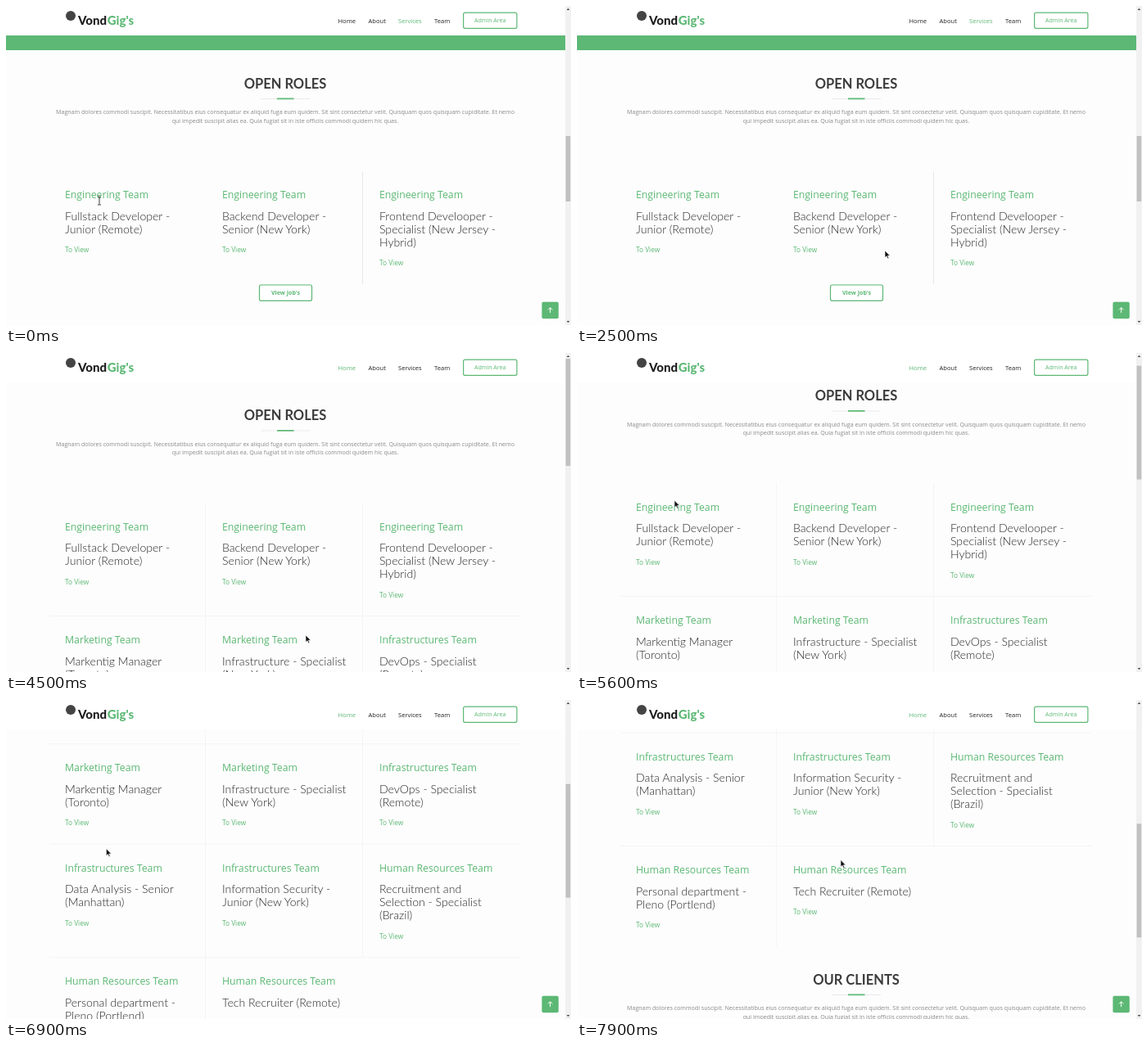
An HTML page for the animation above (8 s loop, 690 by 390 pixels).

```html
<!DOCTYPE html>
<html lang="en">
<head>
<meta charset="utf-8">
<title>Open roles</title>
<style>
  html, body { margin: 0; width: 100%; height: 100%; overflow: hidden; background: #fdfdfd; }
  svg { display: block; width: 100vw; height: 100vh; }
  text { font-family: "Open Sans", sans-serif; fill: #222; }
  .head { font: 700 16.5px Lato, sans-serif; fill: #3c3c3c; text-anchor: middle; }
  .para { font-size: 7.1px; fill: #8a8a8a; text-anchor: middle; }
  .team { font-size: 12.27px; fill: #5cb874; }
  .job { font: 300 14.1px Lato, sans-serif; fill: #262626; }
  .view { font-size: 8.3px; fill: #5cb874; }
  .nav { font-size: 7.58px; }
  .btn { font-size: 7.07px; fill: #5cb874; text-anchor: middle; }
  .logo { font: 800 15px Lato, sans-serif; fill: #1d1d1d; }
  .tip { font-size: 6px; fill: #5f6368; }
</style>
</head>
<body>
<svg id="stage" viewBox="0 0 690 390"></svg>
<script>
const GREEN = '#5cb874', RULE = '#f2f2f2', LOOP = 8000, STEP = 100;
const stage = document.getElementById('stage');

function add(parent, tag, attrs, text) {
  const node = document.createElementNS('http://www.w3.org/2000/svg', tag);
  set(node, attrs);
  if (text) node.textContent = text;
  parent.appendChild(node);
  return node;
}
function set(node, attrs) {
  for (const key in attrs) node.setAttribute(key, attrs[key]);
}
const group = parent => add(parent, 'g', {});
const rect = (parent, x, y, width, height, fill, more) =>
  add(parent, 'rect', { x, y, width, height, fill, ...more });
const label = (parent, cls, x, y, text) => add(parent, 'text', { class: cls, x, y }, text);
const show = (node, on) => node.setAttribute('display', on ? 'inline' : 'none');

const LOREM = [
  'Magnam dolores commodi suscipit. Necessitatibus eius consequatur ex aliquid fuga eum quidem. Sit sint consectetur velit. Quisquam quos quisquam cupiditate. Et nemo',
  'qui impedit suscipit alias ea. Quia fugiat sit in iste officiis commodi quidem hic quas.'
];
const ENG = 'Engineering Team', MKT = 'Marketing Team',
      INF = 'Infrastructures Team', HR = 'Human Resources Team';
const ROWS = [
  [[ENG, 'Fullstack Developer -', 'Junior (Remote)'],
   [ENG, 'Backend Developer -', 'Senior (New York)'],
   [ENG, 'Frontend Develooper -', 'Specialist (New Jersey -', 'Hybrid)']],
  [[MKT, 'Markentig Manager', '(Toronto)'],
   [MKT, 'Infrastructure - Specialist', '(New York)'],
   [INF, 'DevOps - Specialist', '(Remote)']],
  [[INF, 'Data Analysis - Senior', '(Manhattan)'],
   [INF, 'Information Security -', 'Junior (New York)'],
   [HR, 'Recruitment and', 'Selection - Specialist', '(Brazil)']],
  [[HR, 'Personal department -', 'Pleno (Portlend)'],
   [HR, 'Tech Recruiter (Remote)']]
];
const ROW_Y = [212, 350.5, 473, 611.5, 734];
const COL_X = [72, 264, 456];

function heading(parent, y, text) {
  label(parent, 'head', 341, y + 6.7, text);
  rect(parent, 311, y + 19.2, 60, 0.6, '#ddd');
  rect(parent, 331, y + 18.5, 20.5, 1.7, GREEN);
  LOREM.forEach((line, i) => label(parent, 'para', 341, y + 38.2 + i * 10.7, line));
}

function card(parent, x, y, [team, ...lines]) {
  label(parent, 'team', x, y + 4.6, team);
  lines.forEach((line, i) => label(parent, 'job', x, y + 31.3 + i * 16, line));
  label(parent, 'view', x, y + 38.8 + lines.length * 15.9, 'To View');
}

function button(parent, x, y, w, h, text, weight) {
  const box = rect(parent, x, y, w, h, '#fff', { rx: 2, stroke: GREEN, 'stroke-width': 1.2 });
  const name = label(parent, 'btn', x + w / 2, y + h / 2 + 2.5, text);
  name.style.fontWeight = weight;
  return { box, name };
}

rect(stage, 0, 0, 690, 390, '#fdfdfd');

// Landing page
const landing = group(stage);
rect(landing, 0, 35, 683, 19, GREEN);
heading(landing, 94, 'OPEN ROLES');
ROWS[0].forEach((item, i) => card(landing, COL_X[i], 230.5, item));
rect(landing, 435, 202.5, 0.8, 137, '#e2e2e2');
const viewJobs = button(landing, 309.5, 341, 64, 19.3, "View Job's", 700);

// Listing page
const listing = group(stage);
heading(listing, 75.5, 'OPEN ROLES');
ROWS.forEach((row, r) => {
  const top = ROW_Y[r] - 29.2, height = ROW_Y[r + 1] - ROW_Y[r];
  if (r) rect(listing, 53, top, 576, 0.8, RULE);
  row.forEach((item, c) => {
    card(listing, COL_X[c], ROW_Y[r], item);
    if (c < row.length - 1) rect(listing, 243.2 + c * 191.8, top, 0.8, height, RULE);
  });
});
heading(listing, 745, 'OUR CLIENTS');

// Header
rect(stage, 0, 0, 683, 36, '#fff');
add(stage, 'circle', { cx: 79, cy: 12, r: 6, fill: '#444' });
const logo = label(stage, 'logo', 88, 22.6, 'Vond');
add(logo, 'tspan', { fill: GREEN, dx: 0.8 }, "Gig's");
const nav = {};
[['Home', 405.5], ['About', 442.5], ['Services', 479], ['Team', 523]].forEach(([name, x]) => {
  nav[name] = label(stage, 'nav', x, 20.5, name);
});
button(stage, 558.6, 8.1, 65.3, 19.2, 'Admin Area', 400);

// Back to top
const toTop = group(stage);
rect(toTop, 654.4, 361.8, 20.4, 20.4, GREEN, { rx: 2 });
add(toTop, 'path', { d: 'M664.6 375.2v-6.4m-2.7 2.7l2.7-2.7 2.7 2.7', fill: 'none', stroke: '#fff', 'stroke-width': 1 });

// Scrollbar
rect(stage, 683, 0, 7, 390, '#f1f1f1');
add(stage, 'path', { d: 'M684.6 5h3.8l-1.9-2.2zM684.6 385h3.8l-1.9 2.2z', fill: '#505050' });
const thumb = rect(stage, 683.6, 0, 5.6, 80, '#c1c1c1');

// Link status
const status = group(stage);
rect(status, -2, 378.5, 62, 13, '#f1f3f4', { rx: 2, stroke: '#d5d7da', 'stroke-width': 0.6 });
label(status, 'tip', 4, 387, 'localhost:8000/#');

// Pointers, each with its hot spot at 0,0
const pointers = {
  arrow: add(stage, 'path', { d: 'M0 0v8.6l2-1.8 1.4 3 1.4-.6-1.4-2.9h2.8z', fill: '#111', stroke: '#fff', 'stroke-width': 0.6 }),
  beam: add(stage, 'path', { d: 'M-2-5h1.4l.6.5.6-.5h1.4M0-4.5v9M-2 5h1.4l.6-.5.6.5h1.4', fill: 'none', stroke: '#222', 'stroke-width': 0.9 }),
  hand: add(stage, 'path', { d: 'M-.8 0q.8-.8 1.6 0v3.4l3.4.7q1 .3.9 1.3l-.5 3-.8 1.8h-4.6l-2.6-3.8q-.2-1.2 1-.9l1.6 1z', fill: '#fff', stroke: '#111', 'stroke-width': 0.7 })
};

// time, x, y, pointer from here on
const MOVES = [
  [0, 114, 238, 'beam'], [100, 114.5, 235, 'beam'], [200, 114.5, 233.5, 'beam'],
  [300, 114.5, 233.5, 'beam'], [500, 111, 250, 'arrow'], [800, 98, 284, 'arrow'],
  [900, 93, 297, 'hand'], [1200, 90, 298, 'hand'], [1300, 104, 298, 'arrow'],
  [1700, 268, 299, 'hand'], [2000, 290, 298, 'hand'], [2100, 309, 298, 'arrow'],
  [2200, 309, 298, 'arrow'], [2500, 376, 299, 'arrow'], [2700, 462, 313, 'hand'],
  [2800, 474, 314, 'hand'], [2900, 488, 250, 'arrow'], [3100, 523, 22, 'arrow'],
  [3200, 534, 19, 'hand'], [3300, 556, 33, 'arrow'], [3400, 614, 48, 'arrow'],
  [3500, 560, 120, 'arrow'], [3800, 385, 330, 'arrow'], [3900, 366, 345, 'hand'],
  [4400, 366, 345, 'arrow'], [4900, 366, 345, 'arrow'], [5200, 119, 180, 'arrow'],
  [6000, 119, 180.5, 'beam'], [6600, 119, 181, 'arrow'], [6900, 122.4, 181.8, 'arrow'],
  [7300, 122.4, 181.8, 'arrow'], [7600, 278, 256, 'hand'], [7700, 296, 236, 'arrow'],
  [7900, 322, 195.5, 'arrow'], [8000, 322, 195.5, 'arrow']
];
const SCROLL = [
  [0, 0], [5400, 0], [5600, 24], [5800, 30], [6200, 54], [6400, 81],
  [6900, 268], [7300, 376], [7500, 404], [8000, 404]
];

function sample(keys, t) {
  let i = 0;
  while (i < keys.length - 2 && t >= keys[i + 1][0]) i++;
  const a = keys[i], b = keys[i + 1], k = (t - a[0]) / (b[0] - a[0]);
  return a.map((v, j) => typeof v === 'number' ? v + (b[j] - v) * k : v);
}

function draw(now) {
  const t = Math.floor(now % LOOP / STEP) * STEP;
  const second = t >= 4400;
  const [, x, y, kind] = sample(MOVES, t);
  const [, scroll] = sample(SCROLL, t);

  show(landing, !second);
  show(listing, second);
  listing.setAttribute('transform', `translate(0 ${-scroll})`);
  show(toTop, !second || scroll > 50);
  set(thumb, second
    ? { y: 7 + scroll * 0.357, height: t < 4600 ? 131 : 139 }
    : { y: 159, height: 80 });

  const active = second ? 'Home' : 'Services';
  const onTeam = t === 3200;
  for (const name in nav)
    nav[name].style.fill = name === active || (onTeam && name === 'Team') ? GREEN : '#222';

  const hovered = t >= 3900;
  viewJobs.box.setAttribute('fill', hovered ? GREEN : '#fff');
  viewJobs.name.style.fill = hovered ? '#fff' : GREEN;

  show(status, kind === 'hand');
  for (const name in pointers) show(pointers[name], name === kind);
  pointers[kind].setAttribute('transform', `translate(${x} ${y})`);
}

const start = performance.now();
function tick() {
  draw(performance.now() - start);
  requestAnimationFrame(tick);
}
tick();
</script>
</body>
</html>
```
